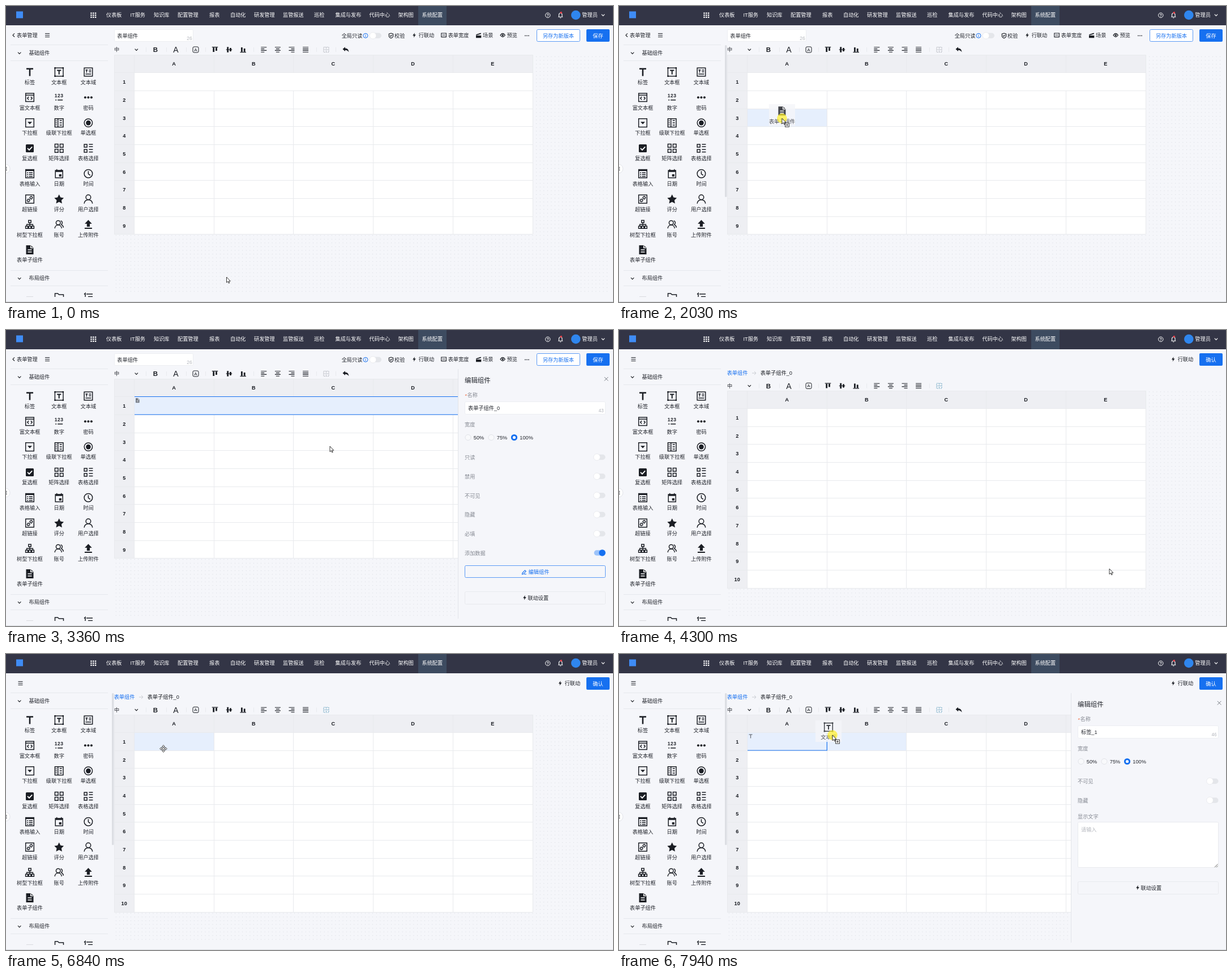
These frames come from a looping animation (1072x522 px, 8000 ms). An HTML page:

```html
<!DOCTYPE html>
<html lang="zh-CN">
<head>
<meta charset="utf-8">
<title>表单编辑器</title>
<style>
html, body { margin: 0; width: 100%; height: 100%; overflow: hidden; background: #f5f6fa; }
svg { display: block; width: 1072px; height: 522px; }
text { font: 9.2px "Liberation Sans", "Noto Sans CJK SC", "Noto Sans CJK", sans-serif; fill: #23262d; white-space: pre; }
.icon { fill: none; stroke: #1b1e24; stroke-width: 1.5; }
.icon .f { fill: #1b1e24; stroke: none; }
.icon .w { stroke: #fff; }
</style>
</head>
<body>
<svg id="stage" viewBox="0 0 1072 522"></svg>
<script>
const INK = '#1b1e24', BLUE = '#1670f0', EDGE = '#5c9bf5', LINE = '#e2e4e9', GRID = '#e8eaed', PAGE = '#f5f6fa', PALE = '#e6effd';
const LOOP = 8000;

const text = (x, y, s, fill = '#23262d', size = 9.2, extra = '') =>
  `<text x="${x}" y="${y + size * .37}" style="fill:${fill};font-size:${size}px;${extra}">${s}</text>`;
const mid = (x, y, s, fill, size, extra = '') => text(x, y, s, fill, size, 'text-anchor:middle;' + extra);
const rect = (x, y, w, h, fill, extra = '') =>
  `<rect x="${x}" y="${y}" width="${w}" height="${h}" fill="${fill}" ${extra}/>`;
const path = (d, color = INK, w = 1.1, extra = '') =>
  `<path d="${d}" fill="none" stroke="${color}" stroke-width="${w}" ${extra}/>`;
const dot = (x, y, r, fill, extra = '') => `<circle cx="${x}" cy="${y}" r="${r}" fill="${fill}" ${extra}/>`;
const at = (x, y, s) => `<g transform="translate(${x} ${y})">${s}</g>`;
const group = (id, s) => `<g id="${id}">${s}</g>`;
const box = (x, y, w, h, stroke = LINE, fill = '#fff') =>
  rect(x + .5, y + .5, w - 1, h - 1, fill, `stroke="${stroke}" rx="2"`);
const chevron = (x, y, color = INK) => path(`M${x - 2.7} ${y - 1.4}l2.7 2.8 2.7-2.8`, color);
const bolt = (x, y) => at(x, y, `<path d="M.8-4.3-2.8.7H-.5L-1 4.3 2.8-.9H.4Z" fill="${INK}"/>`);

const FRAME = '<path d="M-7.3-7.3H7.3V7.3H-7.3Z"/>';
const ICONS = {
  标签: '<path stroke-width="2.6" d="M-6-5.8H6M0-5.8V7"/>',
  文本框: FRAME + '<path stroke-width="2.6" d="M-8.4-7.3h2.6M5.8-7.3h2.6M-8.4 7.3h2.6M5.8 7.3h2.6"/><path stroke-width="2" d="M-3.6-3H3.6M0-3V4.2"/>',
  文本域: FRAME + '<path d="M-5-3.8h4M-3-3.8V1M1-3.5h4M1-.5h4M-5 3.5h10"/>',
  富文本框: FRAME + '<path d="M-7-4H7M-1.8-1.2-4.2 1.4-1.8 4M1.8-1.2 4.2 1.4 1.8 4"/>',
  数字: '<text text-anchor="middle" y="0" style="font-size:8.5px;font-weight:700;letter-spacing:.5px;stroke:none">123</text><path d="M-6.5 4.5h2M-2.5 4.5h9"/>',
  密码: [-5.5, 0, 5.5].map(x => `<circle class="f" cx="${x}" r="2"/>`).join(''),
  下拉框: FRAME + '<path class="f" d="M-4-1.8H4L0 2.4Z"/>',
  级联下拉框: FRAME + '<path d="M-2-7V7M-6-3.5h2M-6 0h2M-6 3.5h2M1-4h4M1 0h4M1 4h4"/>',
  单选框: '<circle r="7.2"/><circle class="f" r="4.3"/>',
  复选框: '<rect class="f" x="-7" y="-7" width="14" height="14" rx="1.5"/><path class="w" stroke-width="1.8" d="M-4 0-1 3 4.2-2.6"/>',
  矩阵选择: '<path d="M-7.3-7.3h5.6v5.6h-5.6ZM1.7-7.3h5.6v5.6H1.7ZM-7.3 1.7h5.6v5.6h-5.6ZM1.7 1.7h5.6v5.6H1.7Z"/>',
  表格选择: '<path d="M-7.3-7h5v5h-5ZM-7.3 2h5v5h-5ZM1-6.8h7M1-2.8h7M1 2.2h7M1 6.6h7"/>',
  表格输入: FRAME + '<path stroke-width="2.6" d="M-7-6H7"/><path d="M-5-1.8h2M-5 1.6h2M-5 4.8h2M-1.5-1.8H5M-1.5 1.6H5M-1.5 4.8H5"/>',
  日期: '<path d="M-6.5-5.8h13v13h-13ZM-4-8v2M4-8v2"/><path stroke-width="3" d="M-6-4.5H6"/><path class="f" d="M0 1h4.2v4H0Z"/>',
  时间: '<circle r="7.3"/><path d="M0-4.5V.4L3.4 3"/>',
  超链接: FRAME + '<path d="M-.6-2.2 1.4-4.2a2 2 0 0 1 2.8 2.8L2.2.6M.6 2.2l-2 2a2 2 0 0 1-2.8-2.8l2-2M-1.8 1.8 1.8-1.8"/>',
  评分: '<path class="f" d="M0-8.3 2.6-2.9 8.4-2.1 4.2 2 5.2 7.8 0 5-5.2 7.8-4.2 2-8.4-2.1-2.6-2.9Z"/>',
  用户选择: '<circle cy="-3.2" r="4.3"/><path d="M-7.3 8C-7 -1 7 -1 7.3 8"/>',
  树型下拉框: '<path d="M-2.2-7.2h4.4v4h-4.4ZM-7.4 3h4v4h-4ZM-2 3h4v4h-4ZM3.4 3h4v4h-4ZM0-3V3M-5.4 3V0H5.4V3"/>',
  账号: '<circle cx="-1.5" cy="-3" r="3.8"/><path d="M-7.6 6.8C-7-1 4-1 4.6 6.8M3-6.7a3.8 3.8 0 0 1 1 6.8Q7.4 2 7.7 5.5"/>',
  上传附件: '<path class="f" d="M0-8 6.3-1.2H2.6V4H-2.6V-1.2H-6.3Z"/><path stroke-width="2" d="M-6.5 6.7h13"/>',
  表单子组件: '<path class="f" d="M-6.5-8H2L6.5-3.5V8H-6.5Z"/><path class="w" d="M1.8-7.5v4h4M-3.5 0h7M-3.5 3.7h7"/>'
};
const icon = (x, y, name, scale = 1) =>
  `<g class="icon" transform="translate(${x} ${y}) scale(${scale})">${ICONS[name]}</g>`;
const badge = (x, y, name) => `<g opacity=".6">${icon(x, y, name, .5)}</g>`;

function header() {
  const nav = { 仪表板: 177, IT服务: 219.5, 知识库: 261, 配置管理: 303, 报表: 359, 自动化: 396, 研发管理: 438, 监管报送: 489,
    巡检: 544, 集成与发布: 581.5, 代码中心: 641.5, 架构图: 692.5, 系统配置: 734.5 };
  let s = rect(0, 0, 1072, 34, '#333546') + rect(728, 0, 50, 34, '#3d4b60') + rect(18, 9.5, 12, 12, '#3f8cf5');
  for (let i = 0; i < 9; i++) s += rect(149.3 + i % 3 * 3.8, 11.5 + Math.floor(i / 3) * 3.6, 2.4, 2.3, '#fff');
  for (const name in nav) s += text(nav[name], 16, name, '#fff');
  s += `<circle cx="956.8" cy="16.3" r="4.2" fill="none" stroke="#fff"/>` + mid(956.8, 16.3, '?', '#fff', 7, 'font-weight:700');
  s += path('M975.3 19.3h8M976.5 19v-3.5q0-3 2.8-3t2.8 3V19M978.3 21h2', '#fff') + dot(980.3, 11.8, 1.8, '#f0434b');
  return s + dot(1006.3, 16, 8.3, '#2f86ee') + text(1017.3, 16, '管理员', '#fff') + chevron(1054.5, 16, '#fff');
}

function sidebar() {
  const names = Object.keys(ICONS);
  let s = [68, 96, 466, 493].map(y => rect(8, y, 172, 1, '#e6e8ed')).join('');
  s += chevron(23.7, 83) + text(40.5, 82.3, '基础组件') + chevron(23.7, 480.5) + text(40.5, 480, '布局组件');
  names.forEach((name, i) => {
    const x = 42 + i % 3 * 51.7, row = Math.floor(i / 3) * 44.8;
    s += icon(x, 116.5 + row, name) + mid(x, 134.4 + row, name);
  });
  s += path('M86.5 513v-6h5l2 2h8v4M142 508h11M138 508.5l2-2v6.5M145 512.5h8', INK, 1.5) + rect(36, 512.4, 12, .7, '#c8cad0');
  return s + dot(-1, 287, 8, '#fff', `stroke="${LINE}"`) + path('M0 284.5h1.5M0 287h1.5M0 289.5h1.5');
}

const hamburger = x => path(`M${x} 48.5h8M${x} 51.5h8M${x} 54.5h8`);

function toolbar(y, mergeColor) {
  let s = text(191, y, '中') + chevron(230.3, y) + mid(264, y, 'B', INK, 11.5, 'font-weight:700') + mid(300, y, 'A', INK, 14);
  s += [247, 283, 318, 352, 437, 548].map(x => rect(x, y - 4, 1, 8, '#e8eaee')).join('');
  s += box(329.5, y - 5.5, 11, 11, INK, 'none') + mid(335, y, 'A', INK, 8);
  const bars = (x, rule, d) => at(x, y, path(`M-5.3 ${rule}H5.3`, INK, 1.2) + path(d, INK, 2.8));
  s += bars(369, -4.5, 'M-2.3-3.8V4M2.5-3.8V2') + bars(394, 0, 'M-2.3-4.8V4.8M2.5-3V3') + bars(418.7, 4.5, 'M-2.3 3.8V-4M2.5 3.8V-2');
  // Left edge of the short lines; the last icon is fully justified.
  [-5, -3, -1, -5].forEach((left, i) => {
    const w = i == 3 ? 10 : 6;
    s += at(455.3 + i * 24.6, y, path(`M-5-4.2h10M${left}-1.4h${w}M-5 1.4h10M${left} 4.2h${w}`));
  });
  return s + at(565.5, y, path('M-4.5-4.5h9v9h-9ZM0-4.5v9M-4.5 0h9', mergeColor, 1.2, 'stroke-dasharray="2 1"'));
}
const undo = y => rect(582, y - 4, 1, 8, '#e8eaee') +
  at(600, y, `<path d="M-5.5-1 -1-4.8V-2.4Q5-2.2 5.5 4.5 3.5.8-1 .7V3Z" fill="${INK}"/>`);

const colX = i => 226.5 + 140.7 * i;
const rowY = (first, i) => Math.floor(first + 31.67 * i) + .5;

function sheet(top, first, rows, merged) {
  const bottom = rowY(first, rows);
  let s = rect(191, top, 874, 505 - top, 'url(#dots)') + rect(191, top, 739, bottom - top, '#fff');
  s += rect(191, top, 739, first - top, '#eeeff3') + rect(191, top, 35.5, bottom - top, '#eeeff3');
  return s + '<g class="hits"></g>' + lines(top, first, rows, merged);
}
function lines(top, first, rows, merged) {
  const bottom = rowY(first, rows);
  let d = `M191.5 ${bottom}V${top + .5}H930`, s = '';
  for (let i = 0; i <= rows; i++) {
    d += `M191 ${rowY(first, i)}H930`;
    if (i < rows) s += mid(208.7, rowY(first, i) + 15.8, i + 1, INK, 9.2, 'font-weight:700');
  }
  for (let i = 0; i < 6; i++) {
    const x = Math.floor(colX(i)) + .5;
    d += merged && i && i < 5 ? `M${x} ${top}V${first}M${x} ${rowY(first, 1)}V${bottom}` : `M${x} ${top}V${bottom}`;
    if (i < 5) s += mid(colX(i) + 70, (top + first) / 2, 'ABCDE'[i], INK, 9.2, 'font-weight:700');
  }
  return path(d, GRID, 1) + s;
}

const toggle = (x, y, on) => rect(x, y - 4.7, 20, 9.4, on ? '#9cc3fa' : '#e4e6ea', 'rx="4.7"') +
  dot(on ? x + 14.5 : x + 5, y, 5.8, on ? BLUE : '#fff', on ? '' : `stroke="${LINE}" stroke-width=".7"`);

function mainActions() {
  let s = path('M15 48.3l-3 3.1 3 3.1') + text(19, 51.3, '表单管理') + hamburger(69);
  s += box(191, 41, 140, 22, '#eceef2') + text(196.3, 52.3, '表单组件') + text(319.3, 57, '26', '#b4b7be', 8.5);
  s += text(592.7, 52.3, '全局只读') + `<circle cx="635" cy="52.3" r="4" fill="none" stroke="${BLUE}"/>` + path('M635 50v.9M635 51.7v2.8', BLUE, 1);
  s += toggle(643, 52.3) + path('M680 48l3.7 1.2v3.5q0 2.6-3.7 4-3.7-1.4-3.7-4v-3.5ZM678 52l1.5 1.6 2.6-2.7') + text(686, 52.3, '校验');
  s += bolt(721, 51.5) + text(728.7, 51.3, '行联动') + path('M768.8 48h8.6v6.6h-8.6ZM770.5 51.2h5.2') + text(780.7, 51.3, '表单宽度');
  s += `<path d="M830 50.3l8.5-2.8.6 1.8-8.5 2.5Zm0 1.7h9.3v4.3H830Z" fill="${INK}"/>` + text(842, 51.3, '场景');
  s += path('M873 51.5q4.2-6 8.4 0-4.2 6-8.4 0Z', INK, 1.3) + dot(877.2, 51.5, 1.6, INK) + text(884.7, 51.3, '预览');
  s += [917, 920, 923].map(x => dot(x, 52.3, .9, INK)).join('');
  s += box(937, 41, 77, 22, EDGE) + mid(975.5, 52.5, '另存为新版本', BLUE);
  return s + rect(1025, 41, 41, 22, BLUE, 'rx="2"') + mid(1045.5, 52.5, '保存', '#fff');
}

const subActions = () => hamburger(21.5) + bolt(978.7, 51.5) + text(986.7, 51.3, '行联动') +
  rect(1025, 41, 41, 22, BLUE, 'rx="2"') + mid(1045.5, 52.5, '确认', '#fff') +
  text(190.7, 76, '表单组件', BLUE) + path('M235 76h7M239 73l3 3-3 3', '#c9ccd2', 1) +
  text(249.7, 76, '表单子组件_0', INK, 9.2, 'font-weight:500');

function panel(name, count, switches) {
  const gray = '#858992';
  let s = rect(799, 69, 273, 452, PAGE) + rect(798, 69, 1, 440, LINE);
  s += text(810, 88.4, '编辑组件', '#23262d', 11.4) + path('M1056.8 83l6.6 6.6M1063.4 83l-6.6 6.6', '#777b83', 1);
  s += text(810.5, 115.3, '*', '#ee7048') + text(814.5, 115, '名称', gray) + box(810, 126, 249, 23, '#eceef2');
  s += text(816, 137.2, name) + text(1046.5, 141.5, count, '#b4b7be', 8.2) + text(810, 167, '宽度', gray);
  [[816, '50%'], [857, '75%'], [897.5, '100%']].forEach(([x, label], i) => {
    s += i == 2 ? dot(x, 189.5, 4.1, '#fff', `stroke="${BLUE}" stroke-width="3"`) : dot(x, 189.5, 5, '#f8f9fb', `stroke="${LINE}"`);
    s += text(x + 9.8, 189.7, label);
  });
  switches.forEach((label, i) => s += text(810, 224.7 + i * 33.75, label, gray) + toggle(1038.5, 224.2 + i * 33.75, label == '添加数据'));
  return s;
}
const linkButton = y => box(810, y, 249, 23, '#e8eaee', PAGE) + bolt(916, y + 11) + text(921.5, y + 11.8, '联动设置');

const formPanel = () => panel('表单子组件_0', 43, ['只读', '禁用', '不可见', '隐藏', '必填', '添加数据']) +
  group('editButton', box(810, 415, 249, 22, EDGE, PAGE) + path('M912 428.5l4.5-4.8 1.8 1.8-4.5 4.8-2.3.5ZM915 430.5h4', BLUE) +
  text(922.7, 426.3, '编辑组件', BLUE)) + linkButton(461);
const labelPanel = () => panel('标签_1', 46, ['不可见', '隐藏']) + text(810, 286.7, '显示文字', '#858992') +
  box(810, 296, 249, 81, '#e8eaee') + text(816, 310, '请输入', '#b4b7be') + path('M1052 376l5.5-5.5M1055 376l2.5-2.5', '#555', .9) + linkButton(401);

const ARROW = '<path d="M0 0V9.7L2.3 7.7 3.9 11 5.3 10.3 3.8 7.2H6.8Z" fill="#fff" stroke="#222" stroke-width=".9"/>';
const CURSORS = {
  arrow: ARROW,
  hand: '<path d="M-1.2 8V1q0-1.2 1.1-1.2T1 1V4.8L5.4 5.8Q6.7 6.2 6.5 8L5.7 12.7H.2L-3.8 8.3Q-3.6 6.5-1.2 8ZM2.6 5.2V7M4.5 5.6v1.6" fill="#fff" stroke="#222" stroke-width=".9"/>',
  move: '<path d="M0-6.4 2.4-3.6H.9V-.9H3.6V-2.4L6.4 0 3.6 2.4V.9H.9V3.6H2.4L0 6.4-2.4 3.6H-.9V.9H-3.6V2.4L-6.4 0-3.6-2.4V-.9H-.9V-3.6H-2.4Z" fill="#fff" stroke="#222" stroke-width=".8"/>',
  drag: dot(0, 0, 8.8, '#fff02e', 'opacity=".72"') + ARROW +
    rect(5.6, 8.2, 6.8, 6.8, '#fff', 'stroke="#222" stroke-width=".9"') + path('M7 11.6h4M9 9.6v4', '#222', .9)
};

const ghost = name => rect(0, 0, 46, 38, PAGE, 'opacity=".85"') + `<g opacity=".82">${icon(23, 12, name) + mid(23, 30, name)}</g>`;
const chosenRow = () => rect(227, 118, 703, 31, PALE) + path('M227 117.5H930M227 149.2H930', BLUE, 1) + badge(232.3, 124.3, '表单子组件');
const chosenCell = () => rect(227, 139, 140, 31, PALE) + path('M227 170H367.3V139', BLUE, 1.2) + badge(232.5, 145, '标签');

const $ = id => document.getElementById(id);
$('stage').innerHTML =
  `<defs><pattern id="dots" width="6.57" height="6.57" patternUnits="userSpaceOnUse" x="191" y="86">${dot(3.3, 3.3, .55, '#cdd0d7')}</pattern>
  <clipPath id="side"><path d="M0 34H190V513.2H0Z"/></clipPath></defs>` +
  rect(0, 0, 1072, 522, PAGE) + header() + `<g clip-path="url(#side)">${sidebar()}</g>` + rect(0, 521, 1072, 1, '#dadce1') +
  group('main', mainActions() + toolbar(77, '#b9bcc4') + undo(77) + sheet(86, 117.7, 9, true)) +
  group('sub', subActions() + toolbar(98.5, '#7fb0c8') + sheet(107, 138.4, 10, false)) +
  group('undoSub', undo(98.5)) + group('chosenRow', chosenRow()) + group('chosenCell', chosenCell()) +
  group('formPanel', formPanel()) + group('labelPanel', labelPanel()) +
  group('scroll', rect(187, 69, 3.5, 268, '#dcdee3', 'rx="1.7"')) +
  ['表单子组件', '标签', '文本框'].map((name, i) => group('ghost' + i, ghost(name))).join('') +
  Object.keys(CURSORS).map(kind => group(kind, CURSORS[kind])).join('');

// Pointer moves: start, end, number of steps, then [progress, x, y] points.
const MOVES = [
  [0, 1, 1, [[0, 389.5, 478], [1, 389.5, 478]]],
  [790, 1480, 10, [[0, 389.5, 478], [.6, 37, 472], [1, 38, 438]]],
  [1630, 2260, 9, [[0, 38, 438], [.11, 57, 425], [.667, 288, 198], [1, 319, 147]]],
  [2430, 2431, 1, [[0, 319, 143], [1, 319, 143]]],
  [3360, 3910, 8, [[0, 319, 143], [.125, 572, 205], [1, 866, 421]]],
  [4850, 5290, 7, [[0, 866, 421], [1, 14, 133]]],
  [5460, 5850, 6, [[0, 14, 133], [.167, 13, 131], [1, 26, 114]]],
  [6000, 6080, 2, [[0, 26, 114], [1, 41, 123]]],
  [6230, 6610, 6, [[0, 41, 123], [.167, 54, 139], [1, 278, 165]]],
  [6840, 7620, 11, [[0, 278, 167], [.19, 278, 167], [.55, 100, 130], [.64, 100, 130], [1, 259, 146]]],
  [7690, 7940, 4, [[0, 259, 146], [1, 377, 143]]]
];
const KINDS = [[0, 'arrow'], [1000, 'hand'], [1630, 'drag'], [2430, 'move'], [3360, 'arrow'], [3910, 'hand'], [4150, 'arrow'],
  [6080, 'hand'], [6230, 'drag'], [6840, 'move'], [7070, 'arrow'], [7225, 'hand'], [7380, 'drag']];
const latest = (table, t) => table.filter(row => row[0] <= t).pop();

function pointer(t) {
  const [start, end, n, points] = latest(MOVES, t);
  const p = Math.min(n, 1 + Math.floor((t - start) / (end - start) * (n - 1) + 1e-6)) / n;
  const i = Math.max(1, points.findIndex(q => q[0] >= p));
  const [a, b] = [points[i - 1], points[i]];
  const f = Math.min(1, (p - a[0]) / (b[0] - a[0]));
  return [a[1] + (b[1] - a[1]) * f, a[2] + (b[2] - a[2]) * f];
}

const show = (id, on) => $(id).style.display = on ? '' : 'none';
const place = (id, x, y) => $(id).setAttribute('transform', `translate(${x} ${y})`);

function highlight(t, x, y) {
  const inSub = t >= 4150, first = inSub ? 138.4 : 117.7;
  const dragging = (t >= 1630 && t < 2660) || (t >= 6230 && t < 6920) || t >= 7380;
  const col = Math.floor((x - 226.5) / 140.7), row = Math.floor((y - first) / 31.67);
  const hits = document.querySelector(inSub ? '#sub .hits' : '#main .hits');
  const whole = !inSub && row == 0;
  hits.innerHTML = dragging && col >= 0 && row >= 0 && row < 9
    ? rect(whole ? 227 : colX(col), rowY(first, row), whole ? 703 : 140.7, 31.7, PALE) : '';
}

function draw(t) {
  const [x, y] = pointer(t), kind = latest(KINDS, t)[1], inSub = t >= 4150;
  show('main', !inSub);
  show('sub', inSub);
  show('chosenRow', t >= 2660 && !inSub);
  show('formPanel', t >= 2660 && !inSub);
  for (const id of ['chosenCell', 'labelPanel', 'undoSub']) show(id, t >= 6920);
  show('scroll', (t >= 1020 && t < 2660) || t >= 5200);
  $('editButton').style.opacity = t >= 3910 ? .8 : 1;
  highlight(t, x, y);
  [[1630, 2430, 23, 25], [6230, 6840, 22, 19], [7380, LOOP, 30, 26]].forEach(([from, to, dx, dy], i) => {
    show('ghost' + i, t >= from && t < to);
    place('ghost' + i, x - dx, y - dy);
  });
  for (const id in CURSORS) show(id, id == kind);
  place(kind, x, y);
}

const began = performance.now();
function tick() {
  draw((performance.now() - began) % LOOP);
  requestAnimationFrame(tick);
}
tick();
</script>
</body>
</html>
```
